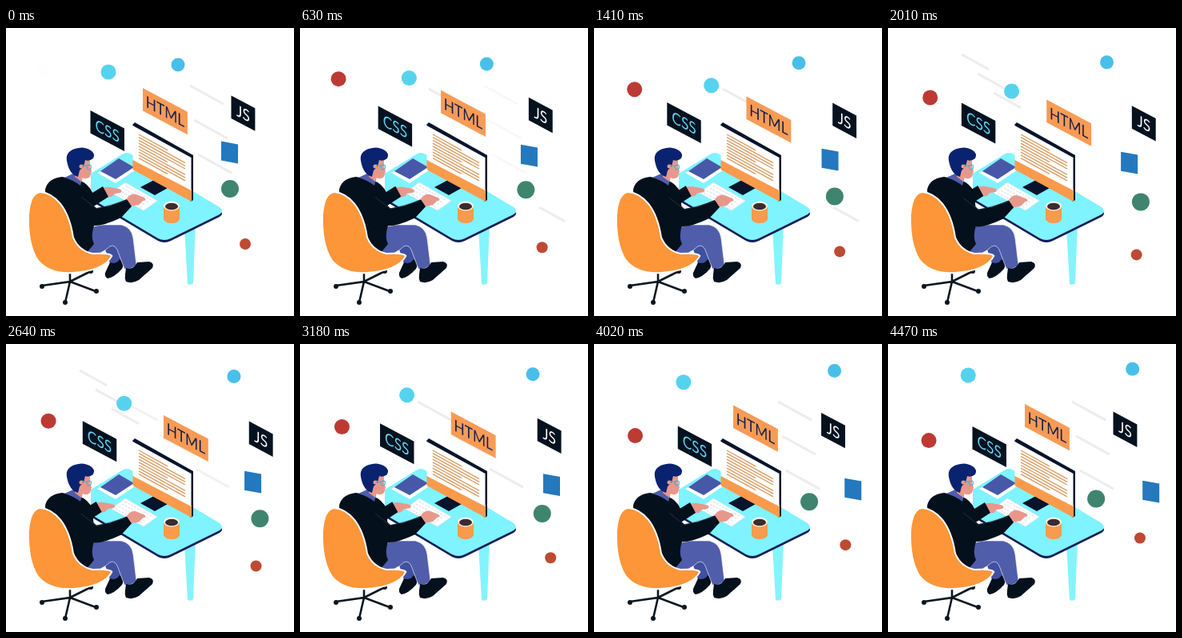
Write an HTML page that moves like this. It is 360x360 px and loops after 4500 ms.

```html
<!DOCTYPE html>
<html lang="en">
<head>
<meta charset="utf-8">
<title>Developer at a desk</title>
<style>
  html, body { margin: 0; width: 100%; height: 100%; overflow: hidden; background: #fff; }
  svg { display: block; width: 100vw; height: 100vh; }
  text { font: 20px Lato, sans-serif; }
</style>
</head>
<body>
<svg viewBox="0 0 360 360">
  <defs>
    <path id="top" d="M106 182L145 158Q151 154 157 158L267 224Q273 229 267 233L206 263Q198 267 190 263L106 213Z"/>
  </defs>
  <g id="trails" stroke="#ededf0" stroke-width="3"></g>

  <g id="desk">
    <path fill="#84f4fc" d="M223 250L237 244L234 319Q231 322 227 320Z"/>
    <use href="#top" y="3" fill="#0b1b57"/>
    <use href="#top" fill="#7ff3ff"/>
    <path fill="#fff" d="M114 181L137 194L161 178L159 173L118 179Z"/>
    <path fill="#4858a9" d="M118 179L141 163L160 174L137 189Z"/>
  </g>

  <g id="monitor">
    <path fill="#07142b" d="M168 199L185 190L202 200L186 209Z"/>
    <path fill="#07142b" d="M158 121L161 118L234 159V215L231 217Z"/>
    <path fill="#fa9a4c" d="M158.500 164L232 202V217L158.500 177Z"/>
    <path fill="#fff" d="M158.500 122L231.500 162V203L158.500 165Z"/>
    <g id="code" stroke="#dc9d63" stroke-width="1.4"></g>
  </g>

  <g id="keyboard">
    <path fill="#fff" stroke="#e3eaf2" d="M132 206L149 193L189 216L172 228Z"/>
    <g id="keys" stroke="#e6e9f0" stroke-width="1.6" stroke-dasharray="3 1.3"></g>
  </g>

  <g id="mug">
    <path fill="#fa9a4c" d="M197 222V239Q199 244 207 244Q215 244 217 239V222Z"/>
    <ellipse cx="207" cy="222.500" rx="10" ry="6" fill="#fff3e4"/>
    <ellipse cx="207" cy="223" rx="8" ry="4.300" fill="#3a2c30"/>
  </g>

  <g id="person">
    <g id="farArm">
      <path fill="#e8988b" d="M120 201Q124 198 130 199L141 201Q147 203 143 206L136 207L132 211L121 212Z"/>
      <path fill="#04101c" d="M92 196L108 206L121 198L128 211L108 224L92 222Z"/>
    </g>
    <path fill="#4050a0" d="M104 262L130 258Q140 266 141 278L145 291L131 297L124 277L106 280Z"/>
    <path fill="#04101c" d="M124 306L130 293Q138 296 142 289Q149 294 145 301Q135 312 127 313Q123 311 124 306Z"/>
    <path fill="#4f5dab" stroke="#fff" stroke-width=".6" d="M86 270Q100 246 122 246L144 246Q157 249 159 263L163 296Q156 303 148 301L139 277Q134 267 125 277L106 288L88 283Z"/>
    <path fill="#04101c" d="M149 308L150 300Q159 303 164 293L179 292Q186 294 183 300L166 315Q158 320 150 317Q148 313 149 308Z"/>
    <path fill="#04101c" d="M49 202Q52 188 70 186L90 190Q103 194 108 206L111 244Q105 260 110 270L100 282L82 276L50 226Z"/>
    <path fill="#4f5dab" d="M73 187L86 181L95 190L93 197Q84 190 73 187Z"/>
    <path fill="#e8988b" d="M87 178L96 163L105 164L105 174L107 179L105 186Q100 190 96 187L94 192L86 186Z"/>
    <path fill="#0a2370" d="M76 166Q74 155 86 151Q97 147 106 153Q112 157 109 163Q104 167 99 165L97 173L92 178L90 186Q79 183 76 166Z"/>
    <circle cx="94" cy="173" r="2.500" fill="#e8988b"/>
    <path fill="none" stroke="#3bb7cf" stroke-width="1.1" d="M95 171L101 173M101 172Q108 169 106 176Q101 179 101 172Z"/>
    <g id="nearArm">
      <path fill="#e8988b" d="M151 213Q157 206 163 208L173 212Q177 215 171 216L166 221L155 223Z"/>
      <path fill="#04101c" d="M70 196Q88 194 94 208L113 225L130 222L151 214L157 223L144 237Q121 248 109 247Q98 245 88 232Z"/>
      <path fill="none" stroke="#3a4752" stroke-width=".6" d="M94 211L113 226L150 216"/>
    </g>
  </g>

  <g id="chair">
    <path fill="none" stroke="#0b1720" stroke-width="2.600" d="M80 302V317L45 322M80 317L74 343M80 317L112 329M80 317L106 304"/>
    <path fill="none" stroke="#0b1720" stroke-width="6" stroke-linecap="round" d="M45 323h0M74 343h0M113 329h0M106 304h0"/>
    <path fill="#fd9639" stroke="#fff" stroke-width="4" paint-order="stroke" d="M43 206Q31 207 29 234Q28 270 40 289Q54 307 84 305Q122 302 131 285Q128 282 108 283Q90 279 83 262Q79 235 67 220Q56 207 43 206Z"/>
  </g>

  <g id="floating"></g>
</svg>
<script>
const LOOP = 4500, SLOPE = 0.55;
const $ = id => document.getElementById(id);

function add(parent, tag, attrs, text = "") {
  const el = document.createElementNS("http://www.w3.org/2000/svg", tag);
  for (const name in attrs) el.setAttribute(name, attrs[name]);
  el.textContent = text;
  return parent.appendChild(el);
}
const line = (parent, x, y, length) =>
  add(parent, "path", { d: `M${x} ${y}l${length} ${length * SLOPE}` });

for (let i = 0; i < 9; i++) line($("code"), 166, 133 + i * 3.7, i % 4 ? 58 : 36);
for (let i = 0; i < 4; i++) line($("keys"), 149 - i * 4, 197 + i * 3, 34);

// Out-and-back shapes over one loop, u running from 0 to 1.
const wave = u => (1 - Math.cos(u * 2 * Math.PI)) / 2;
const tent = u => 1 - Math.abs(2 * u - 1);
const early = u => wave(u ** 0.68);
const late = u => wave(u ** 1.15);

// A steady drift from (x, y) plus a swing that returns to zero.
const movers = [];
function mover(x, y, [driftX, driftY], [swingX, swingY], shape = tent) {
  const el = add($("floating"), "g", {});
  const place = u => [x + driftX * u + swingX * shape(u), y + driftY * u + swingY * shape(u)];
  movers.push({ el, place });
  return el;
}
function card(label, width, fill, ink, x, y, swing, shape) {
  const g = add(mover(x, y, [0, 0], swing, shape), "g", { transform: "matrix(.866 .46 0 1 0 0)" });
  add(g, "rect", { width, height: 28.5, fill });
  add(g, "text", { x: width / 2, y: 21.5, fill: ink, "text-anchor": "middle" }, label);
}
const dot = (r, fill, ...motion) => add(mover(...motion), "circle", { r, fill });

card("CSS", 49, "#04121f", "#62d3f5", 105.5, 103, [-14.5, -10.2], early);
card("HTML", 64.5, "#f99b55", "#14204f", 171, 75, [28, 15], wave);
card("JS", 34.5, "#04121f", "#fff", 281.5, 84.5, [24, 13], wave);
add(mover(279.5, 155.5, [49.5, 29.3], [0, 0]), "rect",
  { x: -10.5, y: -12, width: 21, height: 24, fill: "#2478bd", transform: "matrix(1 .18 0 1 0 0)" });

dot(9.5, "#55d3ee", 128, 55, [-28.5, -16.5], [44, 35]);
dot(8.5, "#48bfea", 215, 46, [91, -15], [20, 4]);
dot(11, "#3f846f", 280, 201, [-20, -7.5], [50, 22], late);
dot(7, "#bd4a32", 299, 270, [16, -28], [5, 29]);
const redDot = dot(9.5, "#bd3a34", 46, 53, [5, 68], [5, 4]);

// Stepped groups of pale trails, each brightest around its own moment.
const trails = [];
function trailGroup(peak, count, x, y, stepX, stepY, length) {
  for (let i = 0; i < count; i++)
    trails.push({ el: line($("trails"), x + i * stepX, y + i * stepY, length), peak });
}
trailGroup(0, 3, 230, 72, 5, 43, 42);
trailGroup(1020, 2, 161, 76, 138, 148, 32);
trailGroup(2400, 3, 92, 33, 20, 24, 34);
trailGroup(3200, 3, 147, 72, 45, 42, 42);

const clamp = v => Math.max(0, Math.min(1, v));

function draw(now) {
  const t = now % LOOP, u = t / LOOP;
  for (const { el, place } of movers) el.setAttribute("transform", `translate(${place(u)})`);
  redDot.setAttribute("opacity", clamp(t / 240));
  for (const { el, peak } of trails) {
    const gap = Math.abs(t - peak);
    el.setAttribute("opacity", clamp((700 - Math.min(gap, LOOP - gap)) / 200));
  }
  const reach = wave(u);
  $("farArm").setAttribute("transform", `translate(${-9 * reach} ${-reach})`);
  $("nearArm").setAttribute("transform", `translate(0 ${1.5 * reach})`);
}

const start = performance.now();
(function tick() {
  draw(performance.now() - start);
  requestAnimationFrame(tick);
})();
</script>
</body>
</html>
```
